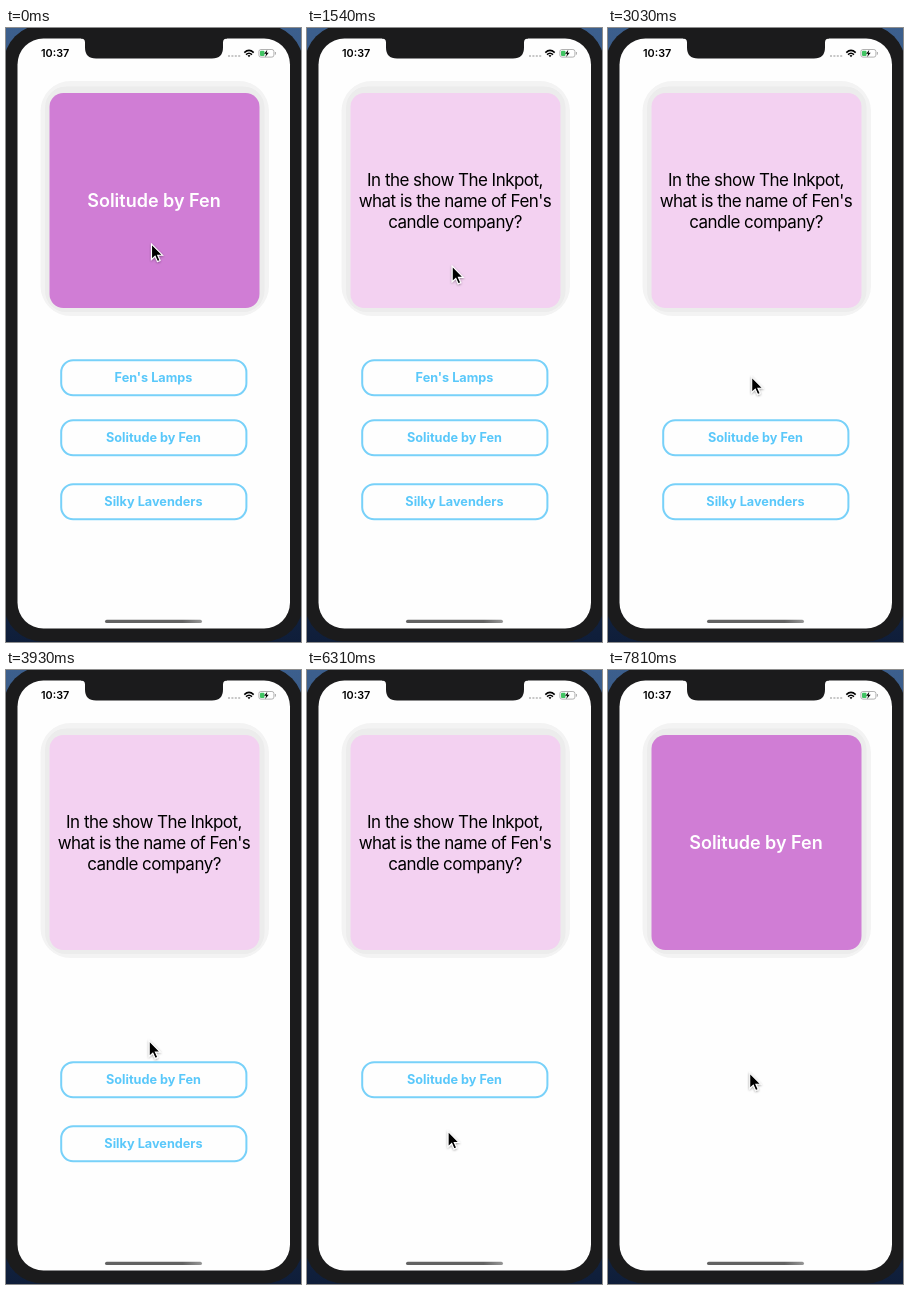
Write an HTML page that moves like this. It is 295x614 px and loops after 8000 ms.

```html
<!DOCTYPE html>
<html lang="en">
<head>
<meta charset="utf-8">
<title>Flash card quiz</title>
<style>
  html, body { margin: 0; width: 100%; height: 100%; overflow: hidden; }
  svg { display: block; width: 295px; height: 614px; font-family: Inter, sans-serif; text-anchor: middle; }
  .title { font-size: 18px; font-weight: 600; fill: #fff; }
  .question { font-size: 17px; letter-spacing: -.53px; }
  .option rect { fill: #fefefe; stroke: #78d1f9; stroke-width: 2; }
  .option text { font-size: 12.7px; font-weight: 700; fill: #5ac8fa; }
  .clock { font-size: 10.8px; font-weight: 600; text-anchor: start; }
</style>
</head>
<body>
<svg viewBox="0 0 295 614">
  <defs>
    <linearGradient id="desk" x2="0" y2="1">
      <stop stop-color="#3c5f8d"/><stop offset="1" stop-color="#0f1e3a"/>
    </linearGradient>
    <linearGradient id="bar">
      <stop offset=".8" stop-color="#626262"/><stop offset="1" stop-color="#979797"/>
    </linearGradient>
    <filter id="soft" x="-50%" y="-50%" width="200%" height="200%">
      <feDropShadow dx="0" dy=".8" stdDeviation=".8" flood-opacity=".4"/>
    </filter>
  </defs>

  <rect width="295" height="614" fill="url(#desk)"/>
  <rect x="-2" y="-3" width="299" height="616.5" rx="38" fill="#1b1b1c"/>
  <rect x="11.5" y="10.5" width="272.5" height="590" rx="26" fill="#fefefe"/>
  <path d="M75 10V10.5q4 0 4 4v5q0 11 11 11h116q11 0 11-11v-5q0-4 4-4v-.5z" fill="#1b1b1c"/>

  <text class="clock" x="35" y="29">10:37</text>
  <path d="M222 28h12.5" stroke="#b5b5b5" stroke-width="1.5" stroke-dasharray="2 1.4"/>
  <g fill="none" stroke="#000" stroke-width="1.6">
    <path d="M238.3 24.6q4.7-4.4 9.4 0M240 26.6q3-2.7 6 0"/>
    <path d="M241.5 27.6q1.5-1 3 0l-1.5 1.6z" fill="#000" stroke="none"/>
  </g>
  <rect x="252.9" y="21.5" width="15" height="7.6" rx="2" fill="#fff" stroke="#aaa" stroke-width=".9"/>
  <rect x="254" y="22.7" width="4.5" height="5.2" rx="1" fill="#41c463"/>
  <path d="M269.4 24v2.6" stroke="#aaa"/>
  <path d="M261.3 21.8l-3.2 4h2l-.9 3.2 3.5-4.2h-2.1z"/>

  <rect x="34.5" y="53" width="228.5" height="235" rx="30" fill="#f3f3f3"/>
  <rect x="39" y="58.5" width="219.5" height="225.5" rx="21" fill="#ececec"/>
  <rect id="card" x="43.5" y="65" width="210" height="215" rx="14"/>
  <text id="answer" class="title" x="148" y="179">Solitude by Fen</text>
  <g id="prompt" class="question">
    <text x="148" y="158">In the show The Inkpot,</text>
    <text x="148" y="179">what is the name of Fen's</text>
    <text x="148" y="200">candle company?</text>
  </g>

  <g id="options"></g>
  <rect x="99" y="591.7" width="97" height="3.4" rx="1.7" fill="url(#bar)"/>
  <path id="cursor" d="M0 0V15.5L3.6 12.2 6 17.6 8.6 16.5 6.2 11.2H11Z"
        stroke="#fff" stroke-width="1.1" filter="url(#soft)"/>
</svg>
<script>
const LOOP = 8000, STEP = 148, STEPS = 6;
const $ = id => document.getElementById(id);

// Each option dims when pressed, then disappears.
const options = [
  { label: "Fen's Lamps", y: 332, press: 2890, gone: 3030 },
  { label: "Solitude by Fen", y: 392, press: 7660, gone: 7810 },
  { label: "Silky Lavenders", y: 456, press: 5420, gone: 5560 },
];
const start = [145.5, 216];
const moves = [
  { at: 1400, to: [143.7, 349], power: 1 },
  { at: 3930, to: [141, 469], power: .95 },
  { at: 6310, to: [141.7, 403], power: 1.2 },
];

$("options").innerHTML = options.map(({ label, y }) => `
  <g class="option">
    <rect x="55.2" y="${y + .2}" width="185.2" height="35" rx="12"/>
    <text x="147.5" y="${y + 22}">${label}</text>
  </g>`).join("");
const buttons = [...$("options").children];

function cursorAt(t) {
  let pos = start;
  for (const { at, to, power } of moves) {
    if (t < at) break;
    const step = Math.min(STEPS, Math.floor((t - at) / STEP) + 1);
    const k = (step / STEPS) ** power;
    pos = pos.map((v, i) => v + (to[i] - v) * k);
  }
  return pos;
}

function show(el, visible) {
  el.style.display = visible ? "" : "none";
}

function draw(now) {
  const t = now % LOOP;
  const asking = t >= 500 && t < 7810;
  $("card").setAttribute("fill", asking ? "#f3d1f1" : "#d07dd5");
  show($("prompt"), asking);
  show($("answer"), !asking);
  options.forEach(({ press, gone }, i) => {
    show(buttons[i], t < gone);
    buttons[i].lastElementChild.style.opacity = t < press ? 1 : .22;
  });
  $("cursor").setAttribute("transform", `translate(${cursorAt(t)})`);
  requestAnimationFrame(() => draw(performance.now()));
}
draw(0);
</script>
</body>
</html>
```
